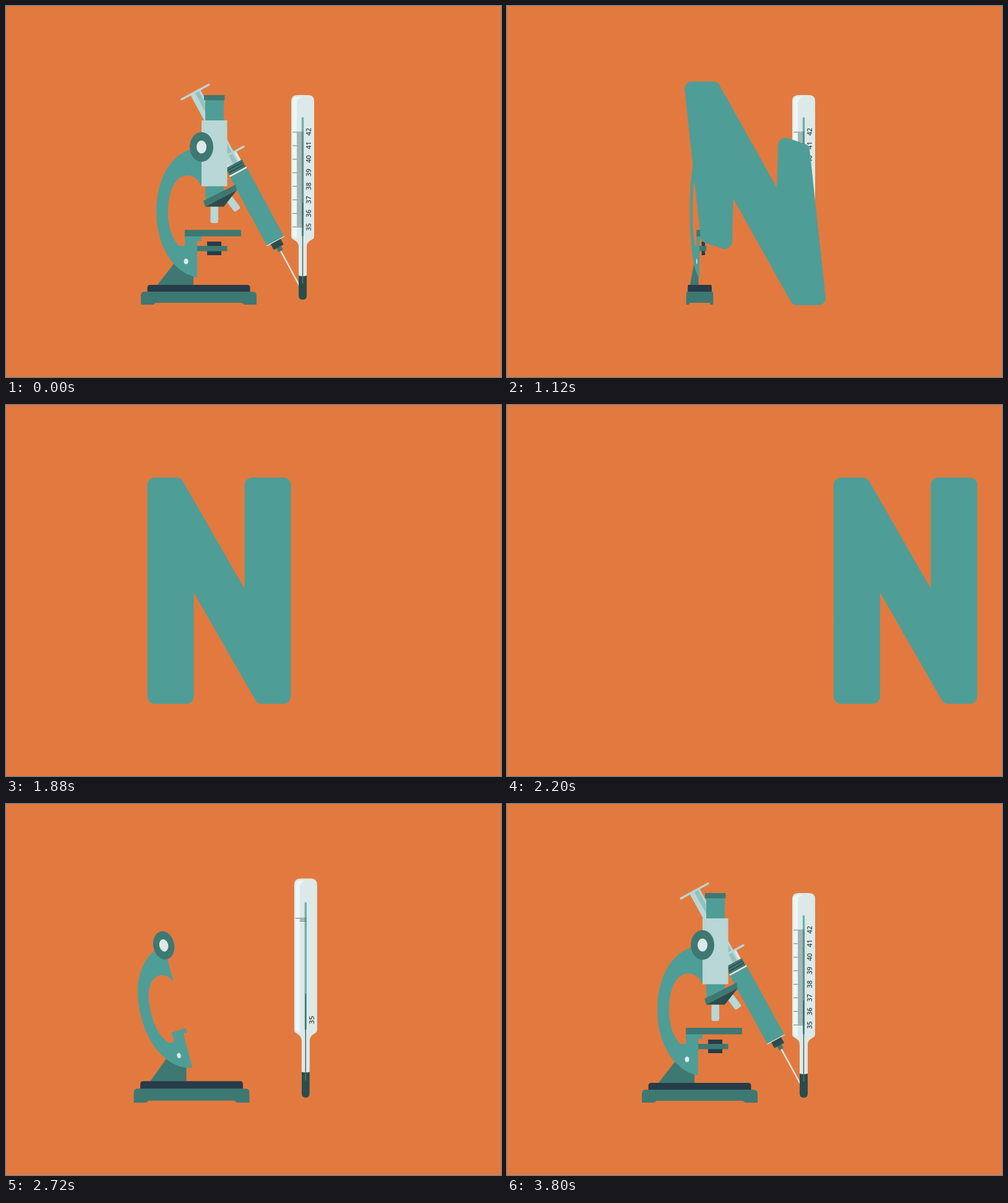
Write an HTML page that moves like this. It is 800 px wide and 600 px high and loops after 3840 ms.

```html
<!DOCTYPE html>
<html lang="en">
<head>
<meta charset="utf-8">
<title>N</title>
<style>
  html, body { margin: 0; width: 100%; height: 100%; overflow: hidden; background: #e27a3f; }
  svg { display: block; width: 100vw; height: 100vh; }
  text { font: 600 11px "Open Sans", sans-serif; text-anchor: middle; }
  .teal { fill: #4f9d97; }
  .deep { fill: #3e7872; }
  .dark { fill: #2c4c4b; }
  .navy { fill: #263c48; }
  .mist { fill: #b8d7d6; }
  .pale { fill: #dde9e8; }
</style>
</head>
<body>
<svg viewBox="0 0 800 600">
  <!-- The syringe points up from its needle tip at the origin -->
  <g id="syringe">
    <path class="pale" d="M-1.2 0V-82H1.2V0Z"/>
    <path class="deep" d="M-4 -78H4V-86H-4Z"/>
    <path class="dark" d="M-9 -85H9V-97H-9Z"/>
    <path class="pale" d="M-12 -237H13V-255H-12Z"/>
    <path class="mist" d="M-9 -238H9V-370H-9Z"/>
    <path fill="#96c1bd" d="M-1 -238H6V-370H-1Z"/>
    <path d="M-27 -255H27M-25 -370H25" stroke="#b8d7d6" stroke-width="3.4" stroke-linecap="round"/>
    <path class="pale" d="M-16 -95.5H16V-97H-16ZM-15.5 -222H15.5V-225H-15.5Z"/>
    <path class="teal" d="M-15.7 -97H15.7V-222H-15.7Z"/>
    <path class="dark" d="M-14 -225H14V-238H-14Z"/>
    <path d="M-14 -226.8H14M-14 -231.5H14M-14 -236.2H14" stroke="#3e7872" stroke-width="3" stroke-linecap="round"/>
  </g>

  <g id="thermometer">
    <path class="pale" d="M461 154Q461 144 471 144H488Q498 144 498 154V372Q498 376 494 378Q486 382 486 389V469Q486 475 479.500 475Q473 475 473 469V389Q473 382 465 378Q461 376 461 372Z"/>
    <path fill="#ebf6f5" d="M463 155Q463 147 471 147H479Q470 149 470 158V376Q463 376 463 370Z"/>
    <path class="dark" d="M473 436Q479.500 438 486 436V469Q486 475 479.500 475Q473 475 473 469Z"/>
    <path d="M479.500 181.500V371" stroke="#6fb0a8" stroke-width="3.4" stroke-linecap="round"/>
    <path d="M479.500 318V437" stroke="#2c5a57" stroke-width="1.3"/>
    <path d="M479.500 437V449" stroke="#4f8580" stroke-width="1.3"/>
    <g id="ticks" stroke="#3f5f5a" stroke-width=".8"></g>
    <g id="labels" class="dark"></g>
  </g>

  <g id="microscope">
    <path class="deep" d="M244 452L272 416H303V452Z"/>
    <path class="navy" d="M228.500 463V456Q228.500 451 233 451H390Q394.500 451 394.500 456V463Z"/>
    <path class="deep" d="M218 483V469Q218 462 224 462H399Q405 462 405 469V483H385L381 480H242L238 483Z"/>
    <g id="condenser">
      <path class="navy" d="M325 381H348V403H325Z"/>
      <path class="deep" d="M308 388H357.500V396.500H308Z"/>
    </g>
    <g id="arm">
      <path class="teal" d="M316 228L300 231C262 243 243 285 243 333C243 391 273 433 309 439V380H316V372H289V388H280C270 378 262 360 262 333C262 300 273 274 294 274C303 274 311 281 316 291Z"/>
      <ellipse class="pale" cx="291" cy="413" rx="3.5" ry="4.5"/>
    </g>
    <path id="stage" class="deep" d="M289 362H380V372.500H289Z"/>
    <g id="tube">
      <rect class="mist" x="-6" y="-24" width="12" height="24" rx="3" transform="translate(374.500 330) rotate(-37)"/>
      <rect class="mist" x="330.5" y="318" width="12.5" height="33" rx="3.500"/>
      <path class="teal" d="M322 152H352V186H322ZM322 291H352V312H322Z"/>
      <path class="deep" d="M320 144H353.500V152.500H320Z"/>
      <path class="mist" d="M316 185H357.500V291.500H316Z"/>
      <path class="deep" d="M319 315L371 289L373 298L322 324.500Z"/>
      <path class="dark" d="M322 324.500L373 298L352 324.500Z"/>
    </g>
    <g id="wheel">
      <ellipse class="deep" cx="316" cy="228" rx="19" ry="24"/>
      <ellipse class="pale" cx="316" cy="228" rx="8" ry="10.500"/>
    </g>
  </g>

  <polygon id="letter" class="teal" stroke="#4f9d97" stroke-linejoin="round"/>
</svg>

<script>
const LOOP = 3840, ASSEMBLY = 2360;
const el = id => document.getElementById(id);
const svgNode = (parent, tag, attrs) => {
  const node = document.createElementNS("http://www.w3.org/2000/svg", tag);
  for (const key in attrs) node.setAttribute(key, attrs[key]);
  return el(parent).appendChild(node);
};
const place = (id, transform) => el(id).setAttribute("transform", transform);
const show = (node, visible) => { node.style.display = visible ? "" : "none"; };

const ramp = (t, from, to) => Math.min(1, Math.max(0, (t - from) / (to - from)));
const smooth = p => p < .5 ? 4 * p ** 3 : 1 - (2 - 2 * p) ** 3 / 2;
const mix = (a, b, p) => a + (b - a) * p;
const spring = (t, start, half = 280, decay = 115) => {
  const s = t - start;
  return s < 0 ? 0 : 1 - Math.exp(-s / decay) * Math.cos(Math.PI * s / half);
};
const scaleAt = (x, y, sx, sy) => `translate(${x} ${y}) scale(${sx} ${sy}) translate(${-x} ${-y})`;

const ticks = Array.from({ length: 71 }, (_, i) =>
  svgNode("ticks", "path", { d: `M${i % 10 ? 470 : 463} ${204 + i * 2.19}H481` }));
const labels = Array.from({ length: 8 }, (_, i) => {
  const label = svgNode("labels", "text", { transform: `translate(492.700 ${357.5 - i * 22}) rotate(-90)` });
  label.textContent = 35 + i;
  return label;
});

// Half outlines: the other half is the same points turned by 180 degrees.
const letterPoses = [
  { time: 600, centre: [407, 324], stroke: 6,
    half: [[-42, -49], [-17, -62], [14, -4], [22, 11], [31, 29]] },
  { time: 900, centre: [402, 305], stroke: 24, ease: smooth,
    half: [[-99, -166], [-66, -166], [36, 25], [46, 50], [60, 88]] },
  { time: 1120, centre: [401, 303], stroke: 24, ease: p => p ** 1.4,
    half: [[-102, -169], [-68, -169], [46, 35], [49, -77], [76, -68]] },
  { time: 1360, centre: [400.5, 300.25], stroke: 24, ease: p => 1 - (1 - p) ** 2,
    half: [[-104, -171], [-69, -171], [53, 42], [53, -171], [104, -171]] }
];

function drawLetter(t) {
  const visible = t >= 600 && t < ASSEMBLY;
  show(el("letter"), visible);
  if (!visible) return;
  const next = Math.max(1, letterPoses.findIndex(pose => pose.time >= t));
  const index = t > 1360 ? 3 : next;
  const a = letterPoses[index - 1], b = letterPoses[index];
  const p = b.ease(ramp(t, a.time, b.time));
  const half = b.half.map((point, i) => point.map((v, k) => mix(a.half[i][k], v, p)));
  const [cx, cy] = b.centre.map((v, k) => mix(a.centre[k], v, p));
  const slide = t < 1880
    ? -56 * smooth(ramp(t, 1520, 1880))
    : -56 + 297.5 * ((t - 1880) / 320) ** 2.14;
  const outline = [...half, ...half.map(([x, y]) => [-x, -y])];
  el("letter").setAttribute("points", outline.join(" "));
  el("letter").setAttribute("stroke-width", mix(a.stroke, b.stroke, p));
  place("letter", `translate(${cx + slide} ${cy})`);
}

function drawSyringe(t) {
  show(el("syringe"), t < 760 || t >= 3330);
  const u = t < 1200 ? t + LOOP : t, s = u - 3720;
  const angle = s < 0
    ? 29.8 * smooth(ramp(u, 3440, 3720))
    : 27.7 + 2.1 * Math.exp(-s / 200) * Math.cos(Math.PI * s / 360);
  const length = smooth(ramp(u, 3330, 3460));
  const shrink = 1 - .67 * smooth(ramp(u, LOOP + 580, LOOP + 760));
  place("syringe", `translate(481 465) rotate(${-angle}) scale(1 ${length}) ${scaleAt(0, -159, 1, shrink)}`);
}

function drawInstruments(t) {
  const T = t < ASSEMBLY ? 1e5 : t;
  const apart = 1 - smooth(ramp(T, 2720, 3100));

  show(el("thermometer"), t < 1320 || t >= 2420);
  place("thermometer", `translate(${4.8 * apart} 0) ${scaleAt(479.5, 475, 1, spring(T, 2420))}`);
  ticks.forEach((tick, i) => show(tick, i < Math.floor(71 * (T - 2700) / 460)));
  labels.forEach((label, i) => show(label, T >= 2700 + i * 60));

  const squash = t < ASSEMBLY ? 1 - ramp(t, 720, 1178) ** 2 : spring(T, 2420, 200, 65);
  show(el("microscope"), squash > 0);
  place("microscope", `translate(${-11.5 * apart} 0) ${scaleAt(311.5, 483, squash, spring(T, 2440))}`);

  const raise = spring(T, 2608);
  const armPose = `rotate(${-145 * (1 - raise)} 291 413) ${scaleAt(291, 413, raise, raise)}`;
  place("arm", armPose);
  place("wheel", armPose);
  place("stage", scaleAt(289, 367, spring(T, 2840, 220, 80), 1));
  place("condenser", scaleAt(308, 392, spring(T, 2900, 200, 70), 1));

  const grow = smooth(ramp(T, 3040, 3200));
  place("tube", `rotate(${-21 * (1 - spring(T, 3040))} 316 228) ${scaleAt(316, 228, grow, grow)}`);
}

function frame(now) {
  const t = now % LOOP;
  drawSyringe(t);
  drawInstruments(t);
  drawLetter(t);
}

const start = performance.now();
function loop() {
  frame(performance.now() - start);
  requestAnimationFrame(loop);
}
loop();
</script>
</body>
</html>
```
